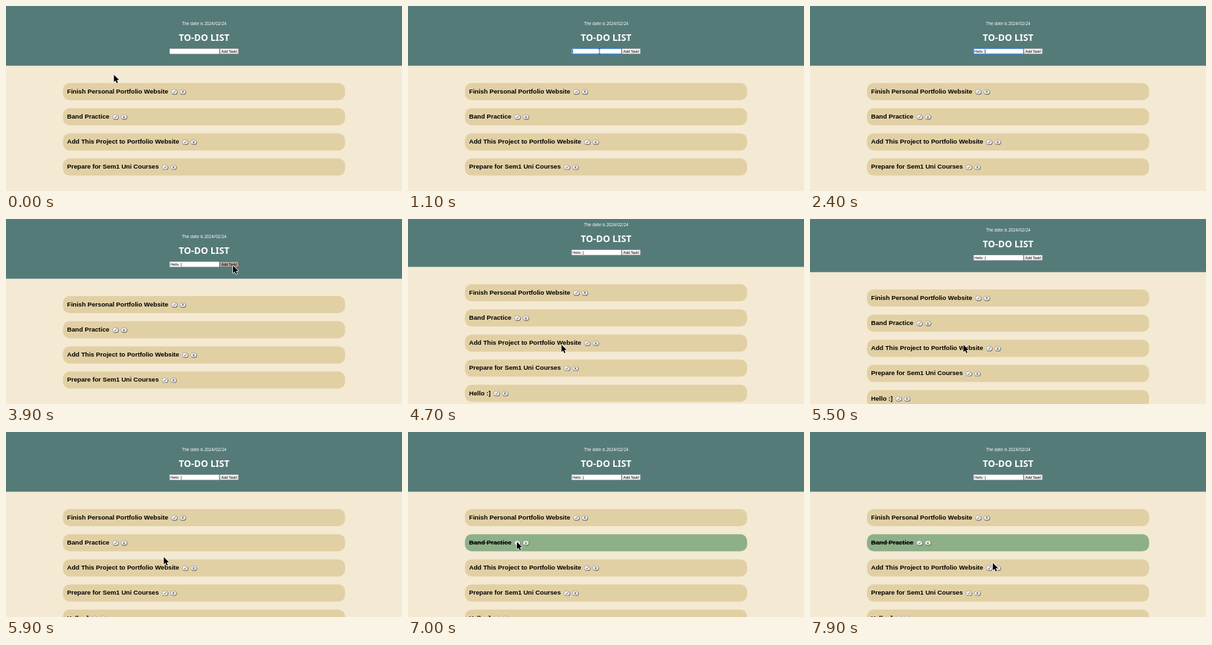
Write an HTML page with a canvas that moves like this. It is 600 by 281 pixels and loops after 8000 ms.

```html
<!DOCTYPE html>
<html lang="en">
<head>
<meta charset="utf-8">
<title>To-do list</title>
<style>
html, body { margin: 0; width: 100%; height: 100%; overflow: hidden; background: #f4e9d2; }
canvas { display: block; width: 600px; height: 281px; }
</style>
</head>
<body>
<canvas id="stage"></canvas>
<script>
const W = 600, H = 281, LOOP = 8000, STEP = 100;
const SANS = '"Liberation Sans", Arial, sans-serif';
const HUMANIST = '"Noto Sans", "Open Sans", sans-serif';
const TASKS = [
  'Finish Personal Portfolio Website',
  'Band Practice',
  'Add This Project to Portfolio Website',
  'Prepare for Sem1 Uni Courses'
];
const NEW_TASK = 'Hello :]';

// Event times in ms
const FOCUS = 1000, TYPE = 1900, LAST_KEY = 2900, BLUR = 3800;
const PRESS = 3900, ADDED = 4000, DONE = 6900;

// Keyframes: time, then values
const POINTER = [
  [0, 163.5, 104.5], [200, 168, 103], [800, 282, 71], [1000, 290, 69],
  [3100, 290, 69], [3500, 361, 76], [3800, 344, 71], [4100, 344, 71],
  [4600, 232.5, 191], [5500, 232.5, 191], [5800, 239, 190], [6200, 239, 190],
  [6700, 165, 167], [7200, 165, 167], [7800, 277, 199], [8000, 277, 199]
];
const SCROLL = [
  [0, 0], [4600, 0], [4700, 18], [4800, 22.5], [4900, 24.2],
  [5400, 24.2], [5500, 10], [5600, 4], [5700, 1], [5800, 0], [8000, 0]
];

const canvas = document.getElementById('stage');
const ctx = canvas.getContext('2d');
const dpr = window.devicePixelRatio || 1;
canvas.width = W * dpr;
canvas.height = H * dpr;

function sample(keys, t, ease = u => u) {
  let i = 1;
  while (i < keys.length - 1 && keys[i][0] < t) i++;
  const [t0, ...a] = keys[i - 1], [t1, ...b] = keys[i];
  const u = ease(Math.min(1, Math.max(0, (t - t0) / (t1 - t0))));
  return a.map((v, k) => v + (b[k] - v) * u);
}

const smooth = u => u * u * (3 - 2 * u);

function text(str, x, y, font, color = '#000', align = 'left') {
  ctx.font = font;
  ctx.fillStyle = color;
  ctx.textAlign = align;
  ctx.fillText(str, x, y);
}

function rect(x, y, w, h, color) {
  ctx.fillStyle = color;
  ctx.fillRect(x, y, w, h);
}

function pill(x, y, w, h, r, fill, stroke, lineWidth = 1) {
  ctx.beginPath();
  ctx.roundRect(x, y, w, h, r);
  ctx.fillStyle = fill;
  ctx.fill();
  if (stroke) {
    ctx.strokeStyle = stroke;
    ctx.lineWidth = lineWidth;
    ctx.stroke();
  }
}

function line(points, color, width) {
  ctx.beginPath();
  points.forEach(([x, y]) => ctx.lineTo(x, y));
  ctx.strokeStyle = color;
  ctx.lineWidth = width;
  ctx.stroke();
}

function typedCount(t) {
  if (t < TYPE) return 0;
  if (t >= LAST_KEY) return NEW_TASK.length;
  return 1 + Math.round(Math.min(1, (t - TYPE) / 500) * 6);
}

function drawField(t) {
  const focused = t >= FOCUS && t < BLUR;
  rect(247.5, 64.3, 76.2, 8.9, '#8a8f8f');
  rect(248.2, 65, 74.8, 7.6, '#fff');
  if (focused) {
    ctx.strokeStyle = '#2f7fd6';
    ctx.lineWidth = 1.3;
    ctx.strokeRect(247.8, 64.5, 75.8, 8.6);
  }
  const value = NEW_TASK.slice(0, typedCount(t));
  text(value, 249.3, 70.9, '5.5px ' + SANS);
  const blinkOff = t < TYPE ? (t - FOCUS) % 1000 >= 500 : t >= 2700 && t < LAST_KEY;
  if (focused && !blinkOff) {
    rect(249.3 + ctx.measureText(value).width, 65.8, 0.7, 6, '#000');
  }
}

function drawHeader(t) {
  rect(0, 0, W, 90.7, '#557b79');
  text('The date is 2024/02/24', 300.3, 29.3, '6.3px ' + HUMANIST, '#fff', 'center');
  text('TO-DO LIST', 300.2, 52.5, 'bold 13.8px ' + HUMANIST, '#fff', 'center');
  drawField(t);
  const pressed = t === PRESS;
  pill(323.9, 64.5, 28.4, 8.4, 1, pressed ? '#aaa49d' : '#efefef', pressed ? '#605c58' : '#6c7070', 0.7);
  text('Add Task!', 338.3, 70.8, '5.5px ' + SANS, '#000', 'center');
}

function drawKey(x, y) {
  pill(x - 4.3, y - 3.1, 9.2, 7.2, 3.6, '#4b4a46');
  pill(x - 4.6, y - 3.6, 8.9, 7, 3.5, '#f3f2ef', '#8a8780', 0.6);
}

function drawTask(label, i, done) {
  const y = 117 + i * 38.2;
  pill(86.3, y, 427.5, 26, 10, done ? '#8db088' : '#e2d0a5');
  text(label, 92.5, y + 15.8, 'bold 9.63px ' + SANS);
  const end = 92.5 + ctx.measureText(label).width;
  if (done) rect(92.5, y + 12.6, end - 92.5, 0.8, '#000');
  const cx = end + 9.3, cy = y + 13.4;
  drawKey(cx, cy);
  line([[cx - 1.8, cy + 0.3], [cx - 0.6, cy + 1.6], [cx + 1.9, cy - 1.9]], '#222', 0.7);
  drawKey(cx + 12.8, cy);
  text('X', cx + 12.7, cy + 1.9, '5.5px ' + SANS, '#000', 'center');
}

function drawArrow(x, y) {
  ctx.save();
  ctx.translate(x, y);
  ctx.beginPath();
  [[0, 0], [0, 11], [2.5, 8.7], [4.3, 12.8], [6.1, 12], [4.4, 8], [7.8, 7.8]]
    .forEach(([px, py]) => ctx.lineTo(px, py));
  ctx.closePath();
  ctx.lineJoin = 'round';
  ctx.lineWidth = 1.4;
  ctx.strokeStyle = '#fff';
  ctx.stroke();
  ctx.fillStyle = '#000';
  ctx.fill();
  ctx.restore();
}

function drawBeam(x, y) {
  rect(x - 0.4, y - 4, 0.8, 8, '#333');
  rect(x - 1.5, y - 4.3, 3, 0.7, '#333');
  rect(x - 1.5, y + 3.6, 3, 0.7, '#333');
}

function drawPointer(t) {
  if (t >= TYPE && t < 3100) return;
  const [x, y] = sample(POINTER, t, smooth);
  const overField = x > 248 && x < 323 && y > 64 && y < 73;
  (overField ? drawBeam : drawArrow)(x, y);
}

function draw(t) {
  ctx.setTransform(dpr, 0, 0, dpr, 0, 0);
  rect(0, 0, W, H, '#f4e9d2');
  ctx.save();
  ctx.translate(0, -sample(SCROLL, t)[0]);
  drawHeader(t);
  const tasks = t >= ADDED ? [...TASKS, NEW_TASK] : TASKS;
  tasks.forEach((label, i) => drawTask(label, i, i === 1 && t >= DONE));
  ctx.restore();
  drawPointer(t);
}

const start = performance.now();
function tick() {
  const t = (performance.now() - start) % LOOP;
  draw(Math.floor(t / STEP) * STEP);
  requestAnimationFrame(tick);
}
tick();
</script>
</body>
</html>
```
